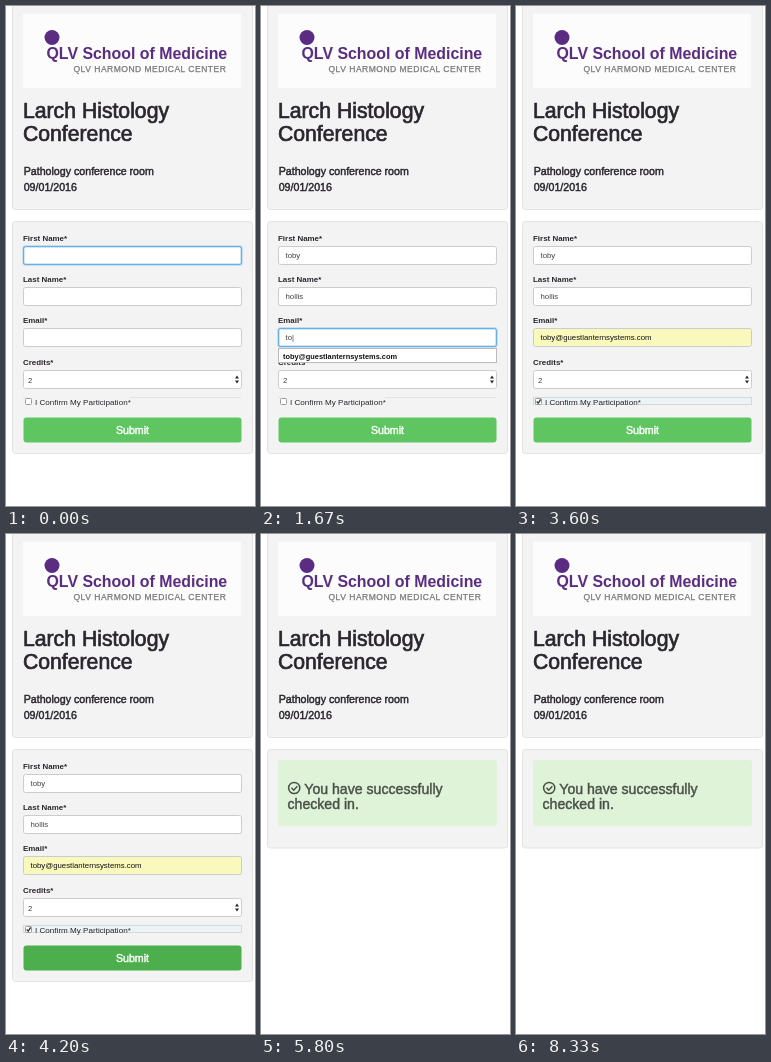
An HTML page that plays this animation: 249x500 px, repeating every 8390 ms.

```html
<!DOCTYPE html>
<html lang="en">
<head>
<meta charset="utf-8">
<title>Conference check-in</title>
<style>
  html, body { margin: 0; width: 100%; height: 100%; overflow: hidden; background: #fff; }
  svg { display: block; width: 249px; height: 500px; font-family: "Liberation Sans", Arial, sans-serif; fill: #2a262e; }
  .panel { fill: #f3f3f3; stroke: #e2e2e2; }
  .logo { fill: #5a2d82; }
  .org { font-size: 15.9px; font-weight: 700; }
  .sub { font-size: 8.5px; letter-spacing: .5px; fill: #777; stroke: #777; stroke-width: .25px; }
  .medium { stroke: currentColor; stroke-width: .45px; color: #2a262e; }
  .title { font-size: 21.2px; stroke-width: .7px; }
  .meta { font-size: 10.65px; }
  .label { font-size: 7.95px; font-weight: 700; }
  .box { fill: #fff; stroke: #ccc; }
  .value { font-size: 7.8px; fill: #444; white-space: pre; }
  .ring { fill: none; stroke: #66afe9; }
  .glow { fill: none; stroke: #66afe9; stroke-width: 3px; stroke-opacity: .3; }
  .confirm { font-size: 8.1px; }
  .option { font-size: 7.4px; font-weight: 700; fill: #111; }
  .submit { font-size: 10.6px; fill: #fff; color: #fff; text-anchor: middle; }
  .message { font-size: 14.12px; }
  .done .message { fill: #4a5048; color: #4a5048; }
  .icon { fill: none; stroke: #4a5048; stroke-width: 1.5px; }
</style>
</head>
<body>
<svg viewBox="0 0 249 500">
  <rect class="panel" x="6.5" y="-4.5" width="240" height="208" rx="3"/>
  <rect x="17" y="8" width="218" height="74" fill="#fcfcfc"/>
  <circle class="logo" cx="46" cy="31.5" r="7.5"/>
  <text class="logo org" x="40.5" y="52.5">QLV School of Medicine</text>
  <text class="sub" x="67.5" y="65.5">QLV HARMOND MEDICAL CENTER</text>
  <text class="medium title" x="17" y="112">Larch Histology</text>
  <text class="medium title" x="17" y="134.5">Conference</text>
  <text class="medium meta" x="17.7" y="168.5">Pathology conference room</text>
  <text class="medium meta" x="17.7" y="185">09/01/2016</text>

  <g id="form">
    <rect class="panel" x="6.5" y="215.5" width="240" height="232" rx="3"/>
    <g id="fields"></g>

    <text class="label" x="17" y="358.5">Credits*</text>
    <rect class="box" x="17.5" y="364.5" width="218" height="18" rx="2"/>
    <text class="value" x="22" y="376.5">2</text>
    <path d="M229 372.5l2-3 2 3zM229 374.5l2 3 2-3z"/>

    <path d="M17 391.5h3M124 391.5h111" stroke="#e2e2e2"/>
    <rect id="legend" x="17.5" y="391.5" width="218" height="7" fill="#edf2f5" stroke="#cbdce6"/>
    <rect x="19.5" y="392.5" width="6" height="6" rx="1" fill="#fff" stroke="#999"/>
    <path id="tick" d="M20.7 395.4l1.5 1.7 2.5-3.7" fill="none" stroke="#333" stroke-width="1.3"/>
    <text class="confirm" x="29" y="399">I Confirm My Participation*</text>

    <rect id="button" x="17.5" y="411.5" width="218" height="25" rx="3"/>
    <text class="medium submit" x="126.5" y="427.5">Submit</text>

    <g id="menu">
      <rect x="17.5" y="342.5" width="218" height="14" fill="#fff" stroke="#bbb"/>
      <text class="option" x="22" y="352.5"></text>
    </g>
  </g>

  <g id="plain">
    <rect class="panel" x="6.5" y="215.5" width="240" height="98.5" rx="3"/>
    <text class="medium message" x="30.2" y="259">You have successfully checked</text>
    <text class="medium message" x="26.7" y="274">in.</text>
  </g>

  <g id="done" class="done">
    <rect class="panel" x="6.5" y="215.5" width="240" height="98.5" rx="3"/>
    <rect x="17" y="226" width="219" height="66" rx="3" fill="#def3d8"/>
    <circle class="icon" cx="33.2" cy="254" r="5.6"/>
    <path class="icon" d="M30.4 253.8l2.3 2.4 3.6-4"/>
    <text class="medium message" x="43.3" y="260">You have successfully</text>
    <text class="medium message" x="26.5" y="275">checked in.</text>
  </g>
</svg>
<script>
  const LOOP = 8390, EASE = 150;
  const MENU_OPEN = 1470, AUTOFILL = 2200, CHECKED = 3500;
  const PRESSED = 4070, SENT = 4270, STYLED = 5800;
  const EMAIL = 'toby@guestlanternsystems.com';

  // Focus times are [from, to]; keys are pressed at start, start + gap, ...
  const fields = [
    { label: 'First Name*', y: 240, text: 'toby', start: 130, gap: 80, focus: [-EASE, 465] },
    { label: 'Last Name*', y: 281, text: 'hollis', start: 600, gap: 100, focus: [465, 1265] },
    { label: 'Email*', y: 322, text: 'to', start: MENU_OPEN, gap: 130, focus: [1265, 3270] }
  ];

  const $ = id => document.getElementById(id);
  const show = (el, on) => { el.style.display = on ? '' : 'none'; };
  const clamp = v => Math.min(1, Math.max(0, v));

  for (const f of fields) {
    const rect = (name, y) => `<rect class="${name}" x="17.5" y="${y + .5}" width="218" height="18" rx="2"/>`;
    const g = document.createElementNS('http://www.w3.org/2000/svg', 'g');
    g.innerHTML = `<text class="label" x="17" y="${f.y - 5.5}">${f.label}</text>
      ${rect('box', f.y)}<g class="halo">${rect('glow', f.y)}${rect('ring', f.y)}</g>
      <text class="value" x="24.5" y="${f.y + 12.3}"></text>`;
    $('fields').append(g);
    f.box = g.querySelector('.box');
    f.halo = g.querySelector('.halo');
    f.value = g.querySelector('.value');
  }
  document.querySelector('.option').textContent = EMAIL;

  function drawField(f, t) {
    const [from, to] = f.focus;
    const filled = f.label === 'Email*' && t >= AUTOFILL;
    const count = Math.max(0, Math.floor((t - f.start) / f.gap) + 1);
    const caret = t >= Math.max(from, 60) && t < to && !filled;
    f.value.textContent = (filled ? EMAIL : f.text.slice(0, count)) + (caret ? '|' : '');
    f.value.style.fill = filled ? '#111' : '';
    f.box.style.fill = filled ? '#faf9bd' : '';
    f.halo.style.opacity = clamp((t - from) / EASE) * (1 - clamp((t - to) / EASE));
  }

  function draw(t) {
    for (const f of fields) drawField(f, t);
    show($('menu'), t >= MENU_OPEN && t < AUTOFILL);
    show($('tick'), t >= CHECKED);
    show($('legend'), t >= CHECKED);
    $('button').style.fill = t >= PRESSED ? '#4cae4c' : '#5ec560';
    show($('form'), t < SENT);
    show($('plain'), t >= SENT && t < STYLED);
    show($('done'), t >= STYLED);
  }

  function tick() {
    draw(performance.now() % LOOP);
    requestAnimationFrame(tick);
  }
  tick();
</script>
</body>
</html>
```
